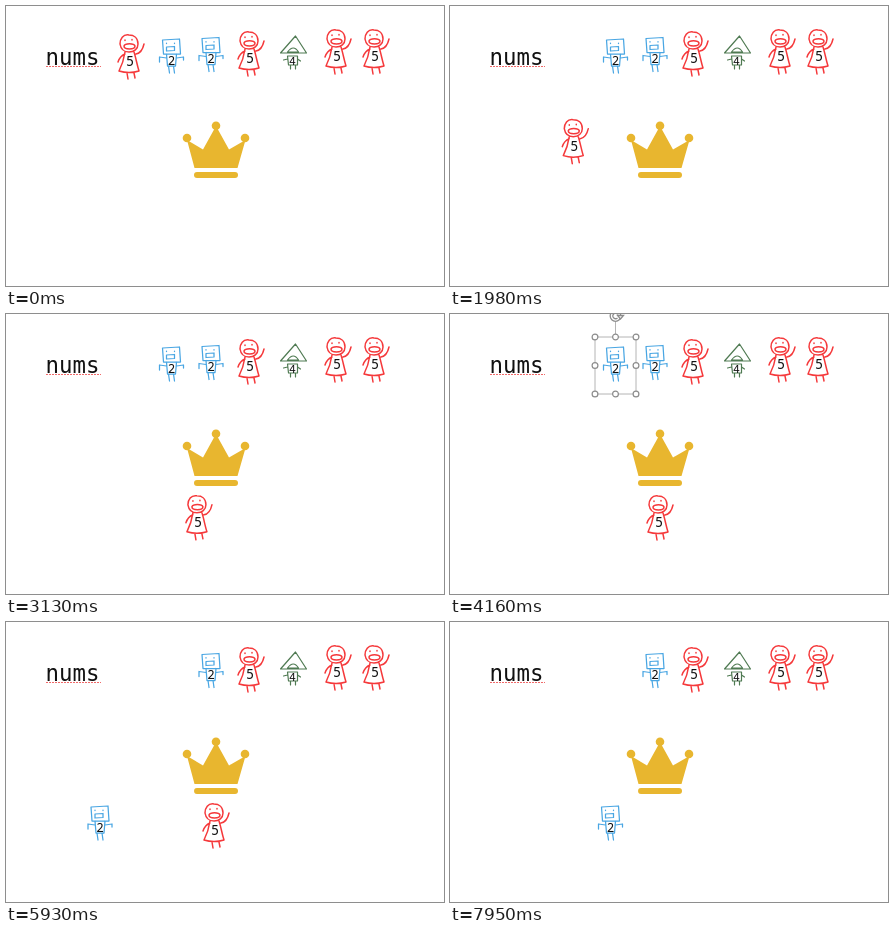
Recreate the animation shown at these times as an HTML page. Size 438x280 px, loop 8000 ms.

```html
<!DOCTYPE html>
<html lang="en">
<head>
<meta charset="utf-8">
<title>nums</title>
<style>
  html, body { margin: 0; width: 100%; height: 100%; overflow: hidden; background: #fff; }
  svg { display: block; }
  .sketch { fill: none; stroke-width: 1.5; stroke-linecap: round; stroke-linejoin: round; }
  .red { stroke: #f5393b; }
  .blue { stroke: #49a6e3; stroke-width: 1.25; }
  .green { stroke: #4f7a52; stroke-width: 1.2; }
  .digit { font: 500 13.5px "Noto Sans Mono", monospace; fill: #111; stroke: none; text-anchor: middle; }
  .nums { font: 22.4px "DejaVu Sans Mono", monospace; fill: #111; }
  .frame { fill: none; stroke: #b4b4b4; }
  .knob { fill: #fff; stroke: #8c8c8c; stroke-width: 1.2; }
  .guide { stroke-dasharray: 3 2; fill: none; }
</style>
</head>
<body>
<svg width="438" height="280" viewBox="0 0 438 280">
  <defs>
    <!-- Figures are drawn around the centre of their digit. -->
    <g id="person">
      <path d="M-1-26C-7-27-10-22-10-17C-9-11-5-9-1-9C4-9 8-12 8-17C8-23 4-26-1-26Z
               M-6-15C-5-18 4-18 5-15C5-11-6-11-6-15Z
               M-5-21v.5M2-21.500v.5
               M-5-9C-6-2-8 4-11 10Q-1 13 9 10C7 4 6-3 4-9
               M-5-7Q-10-5-12 1M6-7Q12-8 14-17M-3 12L-2 18M4 12L5 17"/>
      <text class="digit" y="5">5</text>
    </g>
    <g id="robot">
      <path d="M-9-20L8-21L9-6H-8Z M-5-13L3-13.500V-9.500L-5-9Z M-5-17v.5M3-17v.5
               M-5-6L-4 6H4L5-6M-5-2L-12-3V2M5-2L12-3V0M-3 6L-2 13M2 6L3 13"/>
      <text class="digit" y="4.5" style="font-size:12.5px">2</text>
    </g>
    <g id="tree">
      <path d="M3-25L-12-8L14-8Z M-5-9Q1-17 6-9Z M-5-5L-4 4L5 4V-5Z
               M-5-2L-9-1M5-2L8 0M-2 4V8M3 4V8"/>
      <text class="digit" y="4" style="font-size:11.5px">4</text>
    </g>
  </defs>

  <text class="nums" x="39.5" y="59">nums</text>
  <path d="M40 60.500H95" stroke="#f06a6a" stroke-dasharray="2 1" fill="none"/>

  <g fill="#e8b62f">
    <path d="M181 134L197 143.500L210 120L223 143.500L239.500 134L231.500 162H188.500Z"/>
    <circle cx="210" cy="119.800" r="4.300"/>
    <circle cx="181" cy="132" r="4.300"/>
    <circle cx="239" cy="132" r="4.300"/>
    <rect x="188" y="166" width="44" height="6" rx="3"/>
  </g>

  <g class="sketch red">
    <use href="#person" x="244" y="52"/>
    <use href="#person" x="331" y="50"/>
    <use href="#person" x="369" y="50"/>
    <use href="#person" id="five"/>
  </g>
  <g class="sketch blue">
    <use href="#robot" x="205" y="52.500"/>
    <use href="#robot" id="two"/>
  </g>
  <g class="sketch green"><use href="#tree" x="286.500" y="55"/></g>

  <path class="guide" id="sideGuide" stroke="#ef8585"/>
  <path class="guide" id="topGuide" stroke="#d5dcd0" d="M28 33.500H116"/>
  <path class="guide" id="baseGuide" stroke="#9aa5a5" d="M100 229.500H237"/>
  <g id="selection"></g>
</svg>
<script>
const DURATION = 8000;
const $ = id => document.getElementById(id);

// Each key is [time, x, y].
const fivePath = [
  [1580, 124, 55], [2300, 124.5, 207], [2740, 124.5, 207],
  [3230, 209, 208], [7560, 209, 208], [7940, 465, 208]
];
const twoPath = [
  [4930, 165.500, 54], [5350, 124.500, 131], [5620, 94, 205],
  [6600, 94, 205], [6830, 147.500, 205], [7200, 160.500, 205]
];

function locate(path, t) {
  if (t <= path[0][0]) return path[0].slice(1);
  const i = path.findIndex(key => key[0] > t);
  if (i < 0) return path[path.length - 1].slice(1);
  const [t0, x0, y0] = path[i - 1], [t1, x1, y1] = path[i];
  const k = (t - t0) / (t1 - t0);
  return [x0 + (x1 - x0) * k, y0 + (y1 - y0) * k];
}

const within = (t, ...spans) => spans.some(([from, to]) => t >= from && t < to);
const place = (id, [x, y]) => $(id).setAttribute('transform', `translate(${x} ${y})`);
const show = (id, on) => $(id).style.display = on ? '' : 'none';

function selectionMarkup(height) {
  const w = 20.5;
  let knobs = '';
  for (const x of [-w, 0, w])
    for (const y of [0, height / 2, height])
      if (x || y !== height / 2) knobs += `<circle class="knob" cx="${x}" cy="${y}" r="2.9"/>`;
  return `<path class="frame" d="M${-w} 0H${w}V${height}H${-w}ZM0 0V-15"/>${knobs}
    <g fill="none" stroke="#8c8c8c" stroke-width="1.3">
      <circle cy="-21" r="5.3" fill="#fff"/>
      <path d="M2.5-22.500A2.800 2.800 0 1 0 2-19"/>
      <path d="M2-21.500H8L5-18Z" fill="#fff"/>
    </g>`;
}

const boxes = { five: selectionMarkup(54), two: selectionMarkup(57) };
let selected = '';

function select(name, [x, y]) {
  show('selection', name);
  if (!name) return;
  if (name !== selected) $('selection').innerHTML = boxes[selected = name];
  place('selection', [x, y - 31]);
}

function draw(t) {
  const five = locate(fivePath, t), two = locate(twoPath, t);
  place('five', five);
  place('two', two);
  show('five', t < 7940);

  if (within(t, [910, 1060], [2430, 2760], [3510, 4160])) select('five', five);
  else if (within(t, [4160, 4950], [6260, 6620], [7480, 7560])) select('two', two);
  else select('', five);

  show('sideGuide', within(t, [1060, 1680]));
  $('sideGuide').setAttribute('d', `M144.500 16V${five[1] + 30}`);
  show('topGuide', within(t, [1610, 1650]));
  show('baseGuide', within(t, [6680, 7200]));
}

function tick() {
  draw(performance.now() % DURATION);
  requestAnimationFrame(tick);
}
tick();
</script>
</body>
</html>
```
